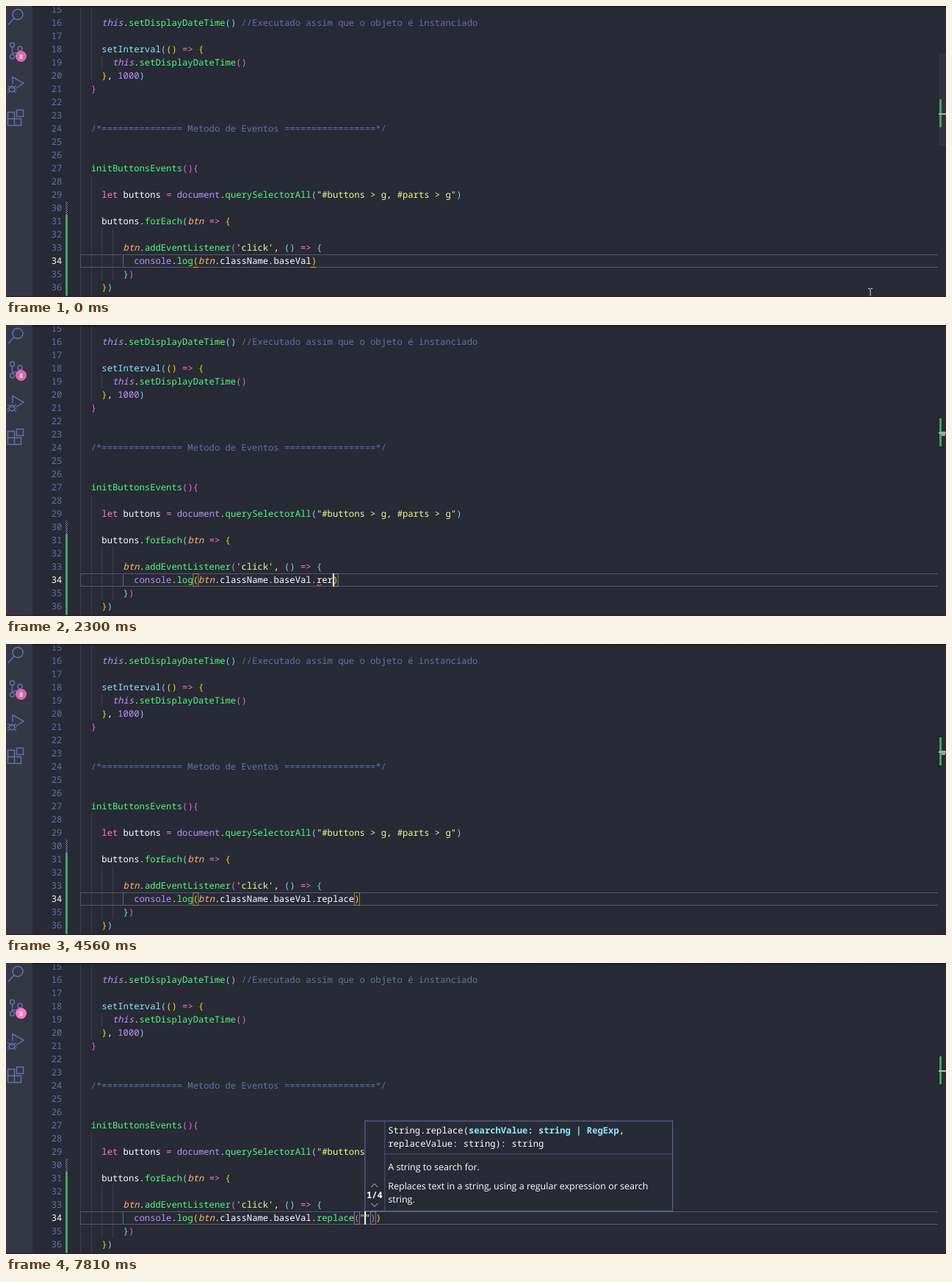
Recreate the animation shown at these times as an HTML page. Size 1280 px wide and 396 px high, loop 8000 ms.

```html
<!DOCTYPE html>
<html lang="pt">
<head>
<meta charset="utf-8">
<title>Editor</title>
<style>
html, body { margin: 0; width: 100%; height: 100%; overflow: hidden; background: #282a36; }
svg { display: block; width: 1280px; height: 396px; }
text { white-space: pre; font: 500 12.19px "Noto Sans Mono", monospace; text-rendering: geometricPrecision; font-variant-ligatures: none; fill: #fff; }
.doc { font: 500 12.5px "Open Sans", sans-serif; }
.bold { font-weight: 700; }
.t, .i { font-style: italic; }
.t, .p { fill: #bd93f9; }
.i { fill: #ffb86c; }
.g { fill: #50fa7b; }
.c { fill: #8be9fd; }
.k { fill: #ff79c6; }
.s { fill: #f1fa8c; }
.m, .n { fill: #6272a4; }
.n { text-anchor: end; }
.now { fill: #f8f8f2; }
.y { fill: #ffd700; }
.o { fill: #da70d6; }
.b { fill: #87cefa; }
.guide { stroke: #3c3f4c; }
.icon { fill: none; stroke: #6272a4; stroke-width: 1.5; }
.box { fill: none; stroke: #8f8a55; }
.box.inner { stroke: #8a7f92; }
</style>
</head>
<body>
<svg viewBox="0 0 1280 396">
  <defs>
    <linearGradient id="shade" x2="0" y2="1">
      <stop stop-color="#15161d"/><stop offset="1" stop-color="#15161d" stop-opacity="0"/>
    </linearGradient>
    <pattern id="hatch" width="3" height="3" patternUnits="userSpaceOnUse">
      <path d="M0 3L3 0" stroke="#8a8fb5"/>
    </pattern>
  </defs>
  <rect width="1280" height="396" fill="#282a36"/>
  <rect width="36" height="396" fill="#343746"/>

  <g class="icon">
    <circle cx="16" cy="11.500" r="7"/><path d="M11 16.500L3 25.500"/>
    <circle cx="8.500" cy="53" r="3"/><circle cx="19" cy="58" r="3"/><circle cx="8.500" cy="69" r="3"/>
    <path d="M8.500 56V66M19 61C19 65 10 62 8.500 66"/>
    <path d="M9 106V96.500L24 105L13.500 112"/>
    <circle cx="8" cy="113" r="3.800"/>
    <path d="M4.500 111.500H11.500M2 108.500L5 110.500M14 108.500L11 110.500M1.500 114H4M12 114H14.500M2 118L5 116M14 118L11 116" stroke-width="1.200"/>
    <path d="M2.500 144.500H11.500V153.500H20.500V162.500H2.500ZM2.500 153.500H11.500V162.500"/>
    <rect x="14.500" y="141.500" width="9" height="9"/>
  </g>
  <circle id="badge" cx="20.500" cy="68.500" r="7.500"/>
  <text id="count" x="20.500" y="71.700" text-anchor="middle" class="bold" style="font-size:8.500px">8</text>

  <path class="guide" d="M101.500 0V396M116.500 0V104M116.500 230V396M130.500 68V86M130.500 302V374M145.500 302V374"/>
  <path stroke="#666a7c" d="M159.500 338V356"/>
  <path stroke="#55586a" fill="none" d="M1270 338.500H101.500V355.500H1270"/>
  <rect x="81" y="266" width="3" height="18" fill="url(#hatch)"/>
  <rect x="81" y="284" width="3" height="112" fill="#46a363"/>
  <g id="code"></g>

  <rect id="open" class="box" y="338.500" width="7" height="17"/>
  <rect id="close" class="box" y="338.500" width="7" height="17"/>
  <path id="under" stroke="#ffd700" stroke-opacity=".8" d="M255 355.500H262M415 355.500H422"/>
  <g id="typed"></g>
  <path id="squiggle" fill="none" stroke="#ff5555" d="M423 355L425 353L427 355L429 353L430 354"/>
  <rect id="caret" y="338" width="2" height="18" fill="#f8f8f2"/>

  <path stroke="#232530" d="M1269.500 0V396"/>
  <rect x="1271" y="127" width="3" height="38" fill="#46a363"/>
  <rect x="1270" y="146" width="10" height="2" fill="#b4b6bd"/>
  <rect id="match" x="1274" y="145" width="5" height="6" fill="#a0a0a0"/>
  <rect id="slider" x="1270" y="65" width="10" height="125" fill="#797982" fill-opacity=".38"/>

  <g id="suggest">
    <rect x="423" y="356" width="410" height="40" fill="#21222c"/>
    <rect x="424" y="357" width="408" height="18" fill="#464a5e"/>
    <path stroke="#343746" fill="none" d="M423.500 396V356.500H832.500V396"/>
    <text x="426" y="370" class="bold doc" style="font-size:8px">abc</text>
    <text x="445" y="370.500">CalcController</text>
    <text x="426" y="388" class="bold doc" style="font-size:8px">abc</text>
    <text x="445" y="388.500">Date</text>
  </g>

  <g id="hint">
    <rect x=".5" y="215" width="419" height="122.500" fill="#282a36" stroke="#6272a4"/>
    <path stroke="#4c5678" d="M27.500 215V337M27.500 260H419"/>
    <text x="32" y="231.500">String.replace(</text>
    <text x="141.700" y="231.500" class="c bold">searchValue: string | RegExp</text>
    <text x="346.500" y="231.500">,</text>
    <text x="32" y="249.500">replaceValue: string): string</text>
    <text x="32" y="282" class="doc">A string to search for.</text>
    <text x="32" y="308" class="doc">Replaces text in a string, using a regular expression or search</text>
    <text x="32" y="326" class="doc">string.</text>
    <text x="2.700" y="320" style="font-weight:600">1/4</text>
    <path fill="none" stroke="#d0d1d2" d="M9 305L13.500 300.500L18 305M9 327L13.500 331.500L18 327"/>
  </g>

  <path id="mouse" fill="none" d="M-3 -6.500H-1L0 -5.500L1 -6.500H3M0 -5.500V5.500M-3 6.500H-1L0 5.500L1 6.500H3"/>
  <rect x="36" width="1244" height="3" fill="url(#shade)"/>
  <rect y="394.500" width="1280" height="1.500" fill="#32202f"/>
</svg>
<script>
const LOOP = 8000, CELL = 7.315, LEFT = 101.1;
const $ = id => document.getElementById(id);
const colX = col => LEFT + col * CELL;
const centerY = line => 347 + (line - 34) * 18;
const escapeText = s => s.replace(/&/g, '&amp;').replace(/</g, '&lt;');

// Each token is one class letter followed by its text; tokens are split by "|".
function tokens(line, col, source) {
  return source.split('|').map(token => {
    const text = token.slice(1);
    const mark = `<text class="${token[0]}" x="${colX(col)}" y="${centerY(line) + 4}">${escapeText(text)}</text>`;
    col += text.length;
    return mark;
  }).join('');
}

const lines = {
  16: [4, 'tthis|w.|gsetDisplayDateTime|b()|m //Executado assim que o objeto é instanciado'],
  18: [4, 'csetInterval|b(|y()|k => |y{'],
  19: [6, 'tthis|w.|gsetDisplayDateTime|o()'],
  20: [4, 'y}|w, |p1000|b)'],
  21: [2, 'o}'],
  24: [2, 'm/*' + '='.repeat(15) + ' Metodo de Eventos ' + '='.repeat(17) + '*/'],
  27: [2, 'ginitButtonsEvents|o(){'],
  29: [4, 'klet|w buttons |k= |pdocument|w.|gquerySelectorAll|b(|s"#buttons > g, #parts > g"|b)'],
  31: [4, 'wbuttons.|gforEach|b(|ibtn|k => |y{'],
  33: [8, "ibtn|w.|gaddEventListener|o(|s'click'|w, |b()|k => |b{"],
  34: [10, 'pconsole|w.|glog|y(|ibtn|w.className.baseVal'],
  35: [8, 'b}|o)'],
  36: [4, 'y}|b)']
};

let markup = '';
for (let n = 15; n <= 36; n++) {
  markup += `<text class="n${n === 34 ? ' now' : ''}" x="76.3" y="${centerY(n) + 4}">${n}</text>`;
  if (lines[n]) markup += tokens(n, ...lines[n]);
}
$('code').innerHTML = markup;

const edits = [
  [0, ''], [850, '.'], [1060, ''], [1590, '.'],
  [2100, '.r'], [2190, '.re'], [2270, '.rer'], [2360, '.rerp'], [2510, '.rerpl'],
  [2780, '.rerp'], [2930, '.rer'], [3130, '.re'],
  [3470, '.rep'], [3570, '.repl'], [3680, '.repla'], [3890, '.replac'], [4050, '.replace'],
  [4940, '.replace()'], [7620, '.replace("")']
];
const caretOff = [[0, 420], [4560, 4940], [5460, 5940], [6450, 6910], [7420, 7620]];
const END = 43;

const between = (t, a, b) => t >= a && t < b;
const ramp = (t, a, b) => Math.min(1, Math.max(0, (t - a) / (b - a)));
const show = (id, on) => $(id).style.display = on ? '' : 'none';
const place = (id, x) => $(id).setAttribute('x', x);
let drawn = null;

function drawTyped(text) {
  if (text === drawn) return;
  drawn = text;
  const [name, args] = text.split('(');
  const source = args === undefined
    ? `w${text}|y)`
    : `w.|g${name.slice(1)}|o(|s${args.slice(0, -1)}|o)|y)`;
  $('typed').innerHTML = tokens(34, END, source);
}

function render(t) {
  const text = edits.filter(([start]) => start <= t).pop()[1];
  drawTyped(text);

  const called = text.endsWith(')');
  const quoted = text.endsWith('")');
  const closeCol = END + text.length - (called ? 1 : 0);
  const caretCol = quoted ? closeCol - 1 : closeCol;
  const matched = t >= 420;
  show('open', matched);
  show('close', matched);
  show('under', !matched);
  show('match', matched && !quoted);
  place('open', colX(called ? 51 : 21) + .2);
  place('close', colX(closeCol) + .2);
  for (const id of ['open', 'close']) $(id).classList.toggle('inner', called);
  place('caret', Math.round(colX(caretCol) - .4));
  show('caret', !caretOff.some(([a, b]) => between(t, a, b)));
  show('squiggle', between(t, 2270, 3570));

  show('suggest', between(t, 1700, 2100));
  show('hint', t >= 5100);
  $('hint').setAttribute('transform', `translate(${t < 7700 ? 481 : 488.3} 0)`);
  $('slider').style.opacity = t < 1590 ? .3 + .7 * ramp(t, 0, 400) : 1 - ramp(t, 1590, 1740);

  const fresh = t >= 7420;
  $('badge').setAttribute('fill', fresh ? '#ff79c6' : '#d869b0');
  $('count').style.opacity = fresh ? 1 : .85;

  const p = ramp(t, 30, 760), ease = p * p * (3 - 2 * p);
  $('mouse').setAttribute('transform', `translate(${1177 - 334 * ease} ${391 - 9 * ease})`);
  $('mouse').setAttribute('stroke', t < 780 ? '#d8d9dc' : '#1f2029');
  show('mouse', t < 2200);
}

function tick() {
  render(performance.now() % LOOP);
  requestAnimationFrame(tick);
}
tick();
</script>
</body>
</html>
```
